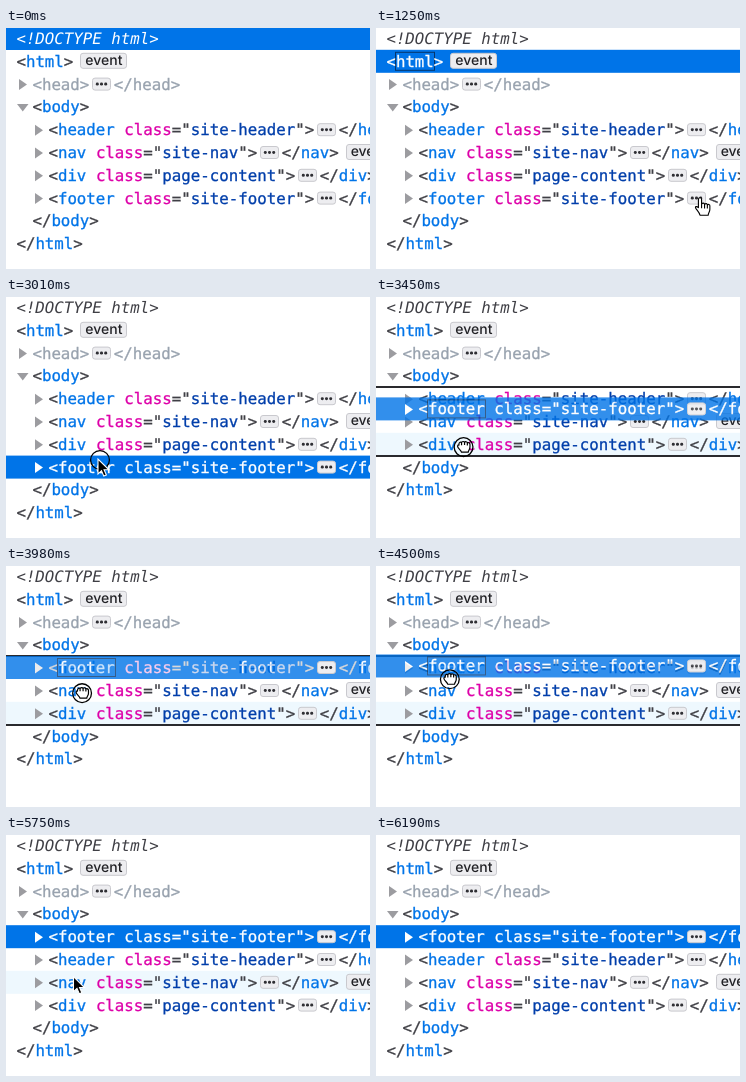
Recreate the animation shown at these times as an HTML page. Size 364 by 241 pixels, loop 6.87 s.

```html
<!DOCTYPE html>
<html lang="en">
<head>
<meta charset="utf-8">
<title>Markup tree: drag a node</title>
<style>
html, body { margin: 0; width: 100%; height: 100%; overflow: hidden; background: #fff; }
#stage {
  position: relative; width: 364px; height: 241px; overflow: hidden; background: #fff;
  font: 15.78px/23px "DejaVu Sans Mono", monospace; color: #3f3f45;
  -webkit-text-stroke: .3px; text-rendering: geometricPrecision; white-space: pre;
}
.row { position: absolute; left: 0; top: 0; width: 364px; height: 22.8px; box-sizing: border-box; }
.row.hover { background: #eef8fe; }
.row.sel { background: #0074e8; }
.row.sel, .row.sel .tag, .row.sel .attr, .row.sel .val { color: #fff; }
.row.drag { opacity: .8; z-index: 2; }
.tag { color: #0074e8; }
.attr { color: #dd00a9; }
.val { color: #003eaa; }
.dim, .dim .tag { color: #98a2ae; }
.doctype { font-style: italic; -webkit-text-stroke: 0; }
.focus .name { outline: 1px solid rgba(10, 20, 40, .65); }
.name { display: inline-block; height: 17px; line-height: 17px; vertical-align: top; margin-top: 3px; }
.arrow { position: absolute; top: 0; width: 12px; height: 23px; fill: #9c9ca0; }
.sel .arrow { fill: #fff; }
.dots, .event {
  display: inline-block; box-sizing: border-box; vertical-align: top; position: relative;
  border: 1px solid #c9c9ce; border-radius: 3px; background: #ededf0; color: #222226;
}
.dots { width: 18.8px; height: 13.5px; margin: 4.6px 2.6px 0 3.1px; }
.dots::before {
  content: ""; position: absolute; left: 7px; top: 4.3px; width: 2.8px; height: 2.8px;
  border-radius: 50%; background: #2f2f34; box-shadow: -4.2px 0 #2f2f34, 4.2px 0 #2f2f34;
}
.event {
  width: 47px; height: 16px; margin: 3.4px 0 0 7px; text-align: center;
  font: 500 14px/13px Inter, "Open Sans", sans-serif; -webkit-text-stroke: 0;
}
.line { position: absolute; left: 0; top: -1px; width: 364px; height: 2px; background: #2a2a2e; z-index: 1; }
#pointer { position: absolute; left: 0; top: 0; width: 1px; height: 1px; overflow: visible; z-index: 3; }
</style>
</head>
<body>
<div id="stage">
  <div class="line" id="dragLine"></div>
  <div class="line" id="dropLine"></div>
  <svg id="pointer">
    <circle id="ring" cx="2" cy="1" r="9.4" fill="none" stroke="#000" stroke-width="1.3"/>
    <path id="arrow" fill="#000" stroke="#fff" stroke-width="1.1"
      d="M0 0V15l3.5-3.3 2.3 5.4 2.6-1.1-2.3-5.2H11z"/>
    <path id="hand" fill="#fff" stroke="#000" stroke-width="1.2" stroke-linejoin="round" transform="scale(.93)"
      d="M-1.7 9V1.5a1.7 1.7 0 0 1 3.4 0V7a1.6 1.6 0 0 1 3.2.3a1.5 1.5 0 0 1 3 .5a1.4 1.4 0 0 1 2.7.7V12c0 3-1.6 4-1.8 6.5H0C-.5 15.5-3 13.5-4.6 11c-1-1.8 1-2.6 2.9-.6zM1.7 7v4M4.9 7.3v4M7.9 7.8v3.4"/>
    <path id="fist" fill="#fff" stroke="#000" stroke-width="1.2" stroke-linejoin="round" transform="translate(2 -1)"
      d="M-4.6-1c0-2 2-2.4 2.6-1.4c.3-1.6 2.6-1.6 3-.2c.6-1.2 2.6-1 2.8.5c1-.8 2.6-.2 2.6 1.5V2c0 2.5-1.5 3-1.7 5h-6.8c-.3-2-3.5-3.5-3.8-5.5c0-1.7.8-2 1.3-1.6zM-2-2.4v2.6M1-2.6v2.6M3.8-2.1v2.4"/>
  </svg>
</div>
<script>
const LOOP = 6870, START = 810, TICK = 88.2, PITCH = 22.8;
const stage = document.getElementById('stage');
const byId = id => document.getElementById(id);
const slot = i => PITCH * i - 1;

const dots = '<span class="dots"></span>';
const event = '<span class="event">event</span>';
const span = (cls, text) => `<span class="${cls}">${text}</span>`;
const open = (name, cls) => '&lt;' + span('tag name', name) +
  (cls ? ` ${span('attr', 'class')}="${span('val', cls)}"` : '') + '&gt;';
const close = name => '&lt;/' + span('tag', name) + '&gt;';
const folded = (name, cls) => open(name, cls) + dots + close(name);

const rows = {};
function addRow(id, indent, html, arrow) {
  const el = document.createElement('div');
  el.className = 'row';
  el.style.paddingLeft = indent + 0.4 + 'px';
  const shape = { right: 'M2 6.5L10 12L2 17.5z', down: 'M0 8.5H11.5L5.75 16z' }[arrow];
  const icon = shape ? `<svg class="arrow" style="left:${indent - 15}px"><path d="${shape}"/></svg>` : '';
  el.innerHTML = icon + html;
  stage.append(el);
  rows[id] = el;
}

addRow('doctype', 10, span('doctype', '&lt;!DOCTYPE html&gt;'));
addRow('html', 10, open('html') + event);
addRow('head', 26, span('dim', folded('head')), 'right');
addRow('body', 26, open('body'), 'down');
addRow('header', 42, folded('header', 'site-header'), 'right');
addRow('nav', 42, folded('nav', 'site-nav') + event, 'right');
addRow('div', 42, folded('div', 'page-content'), 'right');
addRow('footer', 42, folded('footer', 'site-footer'), 'right');
addRow('/body', 26, close('body'));
addRow('/html', 10, close('html'));

const top4 = ['doctype', 'html', 'head', 'body'];
const before = Object.keys(rows);
const during = [...top4, 'header', 'nav', 'div', '/body', '/html'];
const after = [...top4, 'footer', 'header', 'nav', 'div', '/body', '/html'];

// [ms, x, y]
const pointerPath = [
  [810, 350, 209], [980, 334, 186], [1160, 327, 176], [1250, 324, 170],
  [1690, 376, 166], [2040, 376, 165], [2740, 92, 162], [3010, 92, 162],
  [4150, 73, 124], [4240, 73, 124], [4680, 70, 93.5], [5485, 70, 93.5], [6190, 62, 246]
];
// [ms, top]
const dragPath = [[3020, 159], [3540, 96], [3980, 90], [4240, 90], [4680, 86]];

function sample(path, t) {
  const i = path.findIndex(p => p[0] > t);
  if (i === 0) return path[0].slice(1);
  if (i < 0) return path[path.length - 1].slice(1);
  const a = path[i - 1], b = path[i];
  const u = (t - a[0]) / (b[0] - a[0]), k = u * u * (3 - 2 * u);
  return a.slice(1).map((v, n) => v + (b[n + 1] - v) * k);
}

function hovered(t, order, y) {
  if (t < START || t >= 6185 || (t >= 1160 && t < 1330)) return '';
  if (t >= 3090 && t < 5570) return 'div';
  return order.find((id, i) => y >= slot(i) && y < slot(i + 1)) || '';
}

const show = (id, on) => { byId(id).style.display = on ? '' : 'none'; };
const move = (el, x, y) => { el.style.transform = `translate(${x}px, ${y}px)`; };

function draw(ms) {
  const t = START + TICK * Math.floor((ms - START) / TICK + 0.08);
  const dragging = t >= 3090 && t < 4950;
  const order = t < 3090 ? before : dragging ? during : after;
  const [x, y] = sample(pointerPath, t);
  const [dragTop] = sample(dragPath, t);
  const selected = t < 980 ? 'doctype' : t < 1950 ? 'html' : 'footer';
  const over = hovered(t, order, y).replace('/', '');

  for (const id in rows) {
    const c = rows[id].classList, sel = id === selected;
    const top = dragging && id === 'footer' ? dragTop : slot(order.indexOf(id));
    move(rows[id], 0, top);
    c.toggle('sel', sel);
    c.toggle('hover', !sel && over !== '' && id.replace('/', '') === over);
    c.toggle('focus', sel && (id === 'html' || dragging));
    c.toggle('drag', dragging && id === 'footer');
  }

  const target = Math.max(4, Math.min(6, Math.round((dragTop - slot(4)) / PITCH) + 4));
  show('dragLine', dragging);
  show('dropLine', dragging);
  move(byId('dragLine'), 0, Math.round(slot(7)));
  move(byId('dropLine'), 0, Math.round(slot(target)));

  const onBadge = t >= 1160 && t < 3000 && x > 309 && x < 331 && y < 182;
  show('pointer', t >= START && t < 6185);
  show('ring', t >= 2920 && t < 4950);
  show('hand', onBadge);
  show('fist', dragging);
  show('arrow', !onBadge && !dragging);
  move(byId('pointer'), x, y);
}

const t0 = performance.now();
function frame() {
  draw((performance.now() - t0) % LOOP);
  requestAnimationFrame(frame);
}
frame();
</script>
</body>
</html>
```
